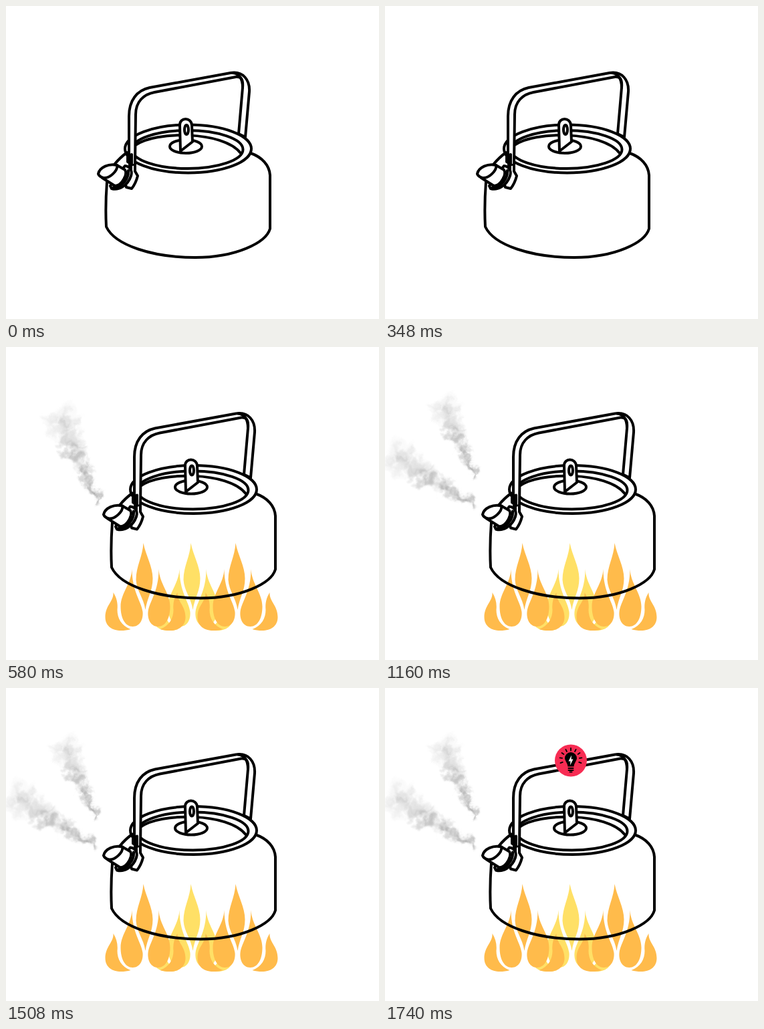
These frames come from a looping animation (558 px wide and 468 px high, 2320 ms). An HTML page:

```html
<!DOCTYPE html>
<html lang="en">
<head>
<meta charset="utf-8">
<title>Boiling kettle</title>
<style>
  html, body { margin: 0; width: 100%; height: 100%; overflow: hidden; background: #fff; }
  svg { display: block; width: 558px; height: 468px; }
  #kettle { fill: none; stroke: #000; stroke-width: 4; stroke-linecap: round; stroke-linejoin: round; }
  #kettle .solid { fill: #fff; }
</style>
</head>
<body>
<svg viewBox="0 0 558 468">
  <defs>
    <filter id="wisp" x="-30%" y="-20%" width="160%" height="140%" color-interpolation-filters="sRGB">
      <feGaussianBlur in="SourceGraphic" stdDeviation="1.6" result="soft"/>
      <feTurbulence type="fractalNoise" baseFrequency=".06" numOctaves="4" seed="7" result="noise"/>
      <feDisplacementMap in="soft" in2="noise" scale="20" xChannelSelector="R" yChannelSelector="G"/>
    </filter>
    <g id="plume" filter="url(#wisp)" fill="#777"></g>
    <g id="side">
      <path d="M-20 332C-21 354-37 368-37 388C-37 406-30 418-19 418C-8 418-3 407-4 396C-6 380-20 366-20 332Z"/>
      <path d="M-48 367C-47 380-60 386-60 404C-60 421-43 428-22 422C-36 417-42 405-42 393C-41 383-43 375-48 367Z"/>
    </g>
    <g id="flame">
      <path d="M-3 293C-4 313-14 328-14 348C-13 365-3 374 0 393C3 374 11 365 11 346C11 328 0 310-3 293Z"/>
      <use href="#side"/>
      <use href="#side" transform="scale(-1 1)"/>
    </g>
  </defs>

  <g id="fire">
    <use href="#flame" x="279.5" fill="#ffe066"/>
    <use href="#flame" x="208.5" fill="#ffbb4b"/>
    <use href="#flame" x="346.5" fill="#ffbb4b"/>
  </g>

  <use id="steamSolo" href="#plume" transform="translate(139 230)"/>
  <g id="steamPair">
    <use href="#plume" transform="translate(136 192) scale(.84)"/>
    <use href="#plume" transform="translate(133 234) rotate(-34)"/>
  </g>

  <g id="kettle">
    <path d="M151 263C149 290 149 312 150 330C163 358 220 376 283 376C344 376 389 354 395 333L395 253C394 238 383 226 366 220"/>
    <path d="M162 237C167 231 174 224 181 219"/>
    <ellipse cx="272.500" cy="213.500" rx="94.500" ry="36"/>
    <ellipse cx="271.500" cy="214.500" rx="83" ry="28.500"/>
    <path d="M194 208C222 187 325 186 351 220"/>
    <ellipse cx="269" cy="210" rx="24" ry="10"/>
    <path class="solid" d="M261 217L260 178C260 166 277 166 278 178L279 203Z"/>
    <ellipse cx="270" cy="185" rx="3" ry="7"/>
    <path class="solid" d="M185 238L184 222V165C184 141 196 126 215 122L336 100C355 97 365 111 364 128L358 196L348 191L354 122C355 110 352 105 344 106L222 129C206 132 194 143 194 162L193 238Z"/>
    <path d="M339 100C349 101 354 108 354 122"/>
    <path class="solid" d="M193 238V247L197 254C195 262 192 268 188 273L180 271L179 267L187 252V240"/>
    <path d="M182 226L188 222V236L182 233Z"/>
    <path class="solid" d="M178 239C187 240 189 248 187 254C182 269 168 276 158 273L156 269Z"/>
    <path class="solid" d="M166 238L178 245C182 251 174 268 163 269L144 257"/>
    <path d="M183 246C184 259 173 271 161 271"/>
    <path class="solid" d="M138 251C140 241 154 235 166 238C168 246 155 258 146 257C142 256 139 254 138 251Z"/>
  </g>

  <g id="idea" transform="translate(278 108.5)">
    <circle r="24" fill="#f72c53"/>
    <path d="M-4.500 9C-4.500 5-9-.5-9-3.500A9 9 0 0 1 9-3.500C9-.5 4.500 5 4.500 9Z"/>
    <path d="M-3.500 11.500H3.500M-3.500 14.500H3.500M-1.500 17H1.500" stroke="#000" stroke-width="2" stroke-linecap="round"/>
    <path d="M1-8L-3.500 1H-.5L-1 7L3.500-2H.5Z" fill="#fff"/>
    <g id="rays" stroke="#000" stroke-width="1.800" stroke-linecap="round"></g>
  </g>
</svg>
<script>
  const STEP = 580, STEPS = 4;
  const $ = id => document.getElementById(id);

  let seed = 11;
  const random = () => (seed = seed * 16807 % 2147483647) / 2147483647;

  // Puffs drift up and left from the nozzle, spreading as they rise.
  let puffs = '';
  for (let i = 0; i < 230; i++) {
    const t = random(), across = random() + random() - 1;
    const spread = 3 + 29 * t;
    const x = -75 * t + 16 * t * t + across * spread;
    const y = -138 * t - across * spread * .35;
    const r = 1.5 + random() * (2 + 6 * t);
    const alpha = .02 + .13 * (1 - t) * (.5 + random());
    puffs += `<circle cx="${x}" cy="${y}" r="${r}" opacity="${alpha}"/>`;
  }
  $('plume').innerHTML = puffs;

  let rays = '';
  for (let a = -110; a <= 110; a += 27.5)
    rays += `<path d="M0-16.500V-13" transform="translate(0 -2) rotate(${a})"/>`;
  $('rays').innerHTML = rays;

  const show = (id, on) => $(id).style.display = on ? '' : 'none';

  function draw(now) {
    const step = Math.floor(now / STEP) % STEPS;
    $('kettle').setAttribute('transform', step ? 'translate(8 -.5)' : '');
    show('fire', step > 0);
    show('steamSolo', step === 1);
    show('steamPair', step > 1);
    show('idea', step === 3);
  }

  const start = performance.now();
  function tick() {
    draw(performance.now() - start);
    requestAnimationFrame(tick);
  }
  tick();
</script>
</body>
</html>
```
